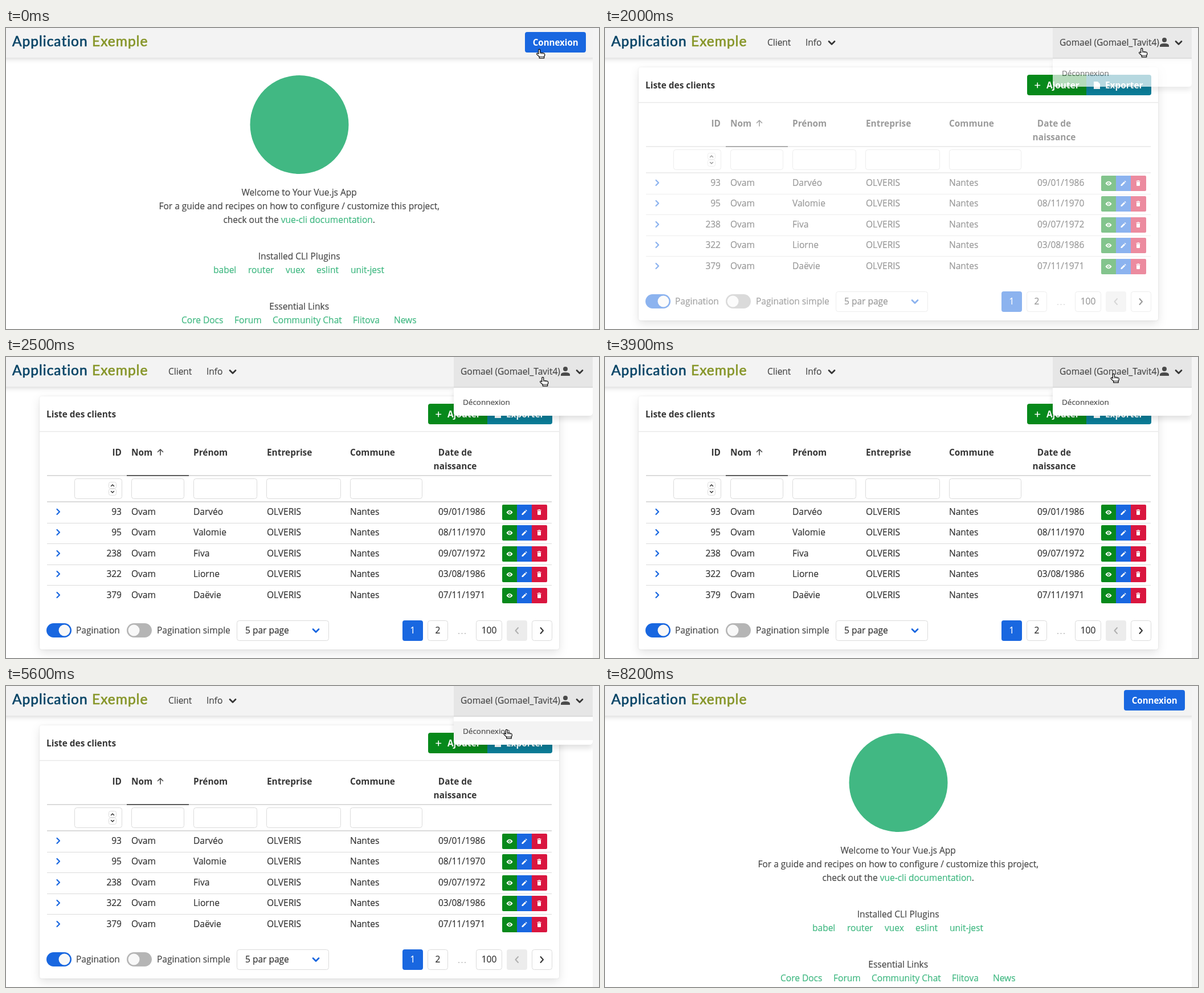
An HTML page that plays this animation: 1041x528 px, repeating every 8.9 s.

```html
<!DOCTYPE html>
<html lang="fr">
<head>
<meta charset="utf-8">
<title>Application Exemple</title>
<style>
html, body { margin: 0; width: 100%; height: 100%; overflow: hidden; background: #fff; }
svg { display: block; width: 1041px; height: 528px; }
text {
  font: 15.53px "Open Sans", "Noto Sans", sans-serif; white-space: pre;
  color: #4a4a4a; fill: currentColor; stroke: currentColor; stroke-width: .22;
}
.b { font-weight: 700; font-size: 15.4px; color: #363636; stroke: none; }
.w { color: #fff; }
.dark { color: #363636; }
.link { color: #42b983; fill: currentColor; stroke: currentColor; }
.small { font-size: 13.5px; }
.button { font-size: 15.1px; }
.brand { font: 24.5px Lato, "Open Sans", sans-serif; letter-spacing: 1px; stroke-width: .7; }
.navy { color: #0b4668; }
.olive { color: #87962a; }
.line { fill: none; stroke-linecap: round; stroke-linejoin: round; }
.box { fill: #fff; stroke: #dbdbdb; }
.bar { filter: drop-shadow(0 2px 4px rgba(10,10,10,.17)); }
.card { filter: drop-shadow(0 6px 8px rgba(10,10,10,.11)) drop-shadow(0 0 1px rgba(10,10,10,.1)); }
.menu { filter: drop-shadow(0 6px 5px rgba(10,10,10,.12)); }
</style>
</head>
<body>
<svg id="stage" viewBox="0 0 1041 528" xmlns="http://www.w3.org/2000/svg"></svg>
<script>
const LOOP = 8900;
const BLUE = '#1967e0', GREEN = '#07891b', RED = '#d9163f', TEAL = '#0b7c97';

const text = (x, y, s, cls = '', anchor = 'start') =>
  `<text x="${x}" y="${y}" class="${cls}" text-anchor="${anchor}">${s}</text>`;
const rect = (x, y, w, h, fill, r = 0, more = '') =>
  `<rect x="${x}" y="${y}" width="${w}" height="${h}" rx="${r}" fill="${fill}" ${more}/>`;
const box = (x, y, w, h, r = 4) =>
  `<rect class="box" x="${x + .5}" y="${y + .5}" width="${w - 1}" height="${h - 1}" rx="${r}"/>`;
const line = (d, color, width = 2) =>
  `<path class="line" d="${d}" stroke="${color}" stroke-width="${width}"/>`;
const down = (x, y, color) => line(`M${x - 5} ${y - 2.5}l5 5 5-5`, color, 2.8);
const group = (id, body) => `<g id="${id}">${body}</g>`;

function homePage() {
  const mid = (y, s) => text(514.7, y, s, '', 'middle');
  const links = (y, list) => list.map(([x, s]) => text(x, y, s, 'link')).join('');
  return '<circle cx="515" cy="169.5" r="86.5" fill="#41b883"/>' +
    mid(294, 'Welcome to Your Vue.js App') +
    mid(318, 'For a guide and recipes on how to configure / customize this project,') +
    mid(342, 'check out the <tspan class="link">vue-cli documentation</tspan>.') +
    mid(406, 'Installed CLI Plugins') +
    links(430, [[364, 'babel'], [425, 'router'], [491, 'vuex'], [545, 'eslint'], [605, 'unit-jest']]) +
    mid(494, 'Essential Links') +
    links(518, [[308, 'Core Docs'], [401, 'Forum'], [468, 'Community Chat'], [609, 'Flitova'], [681, 'News']]);
}

function tableRow([id, first, date], i) {
  const c = Math.round(271 + i * 36.5 - .1), top = c - 12;
  return line(`M89.5 ${c - 4}l4.5 4.5-4.5 4.5`, BLUE, 2.2) +
    text(203, c + 6, id, 'dark', 'end') + text(220, c + 6, 'Ovam', 'dark') +
    text(329, c + 6, first, 'dark') + text(458, c + 6, 'OLVERIS', 'dark') +
    text(604, c + 6, 'Nantes', 'dark') + text(759, c + 6, date, 'dark') +
    rect(871, top, 30, 27, GREEN, 2) + rect(920, top, 30, 27, RED, 2) + rect(897, top, 26, 27, BLUE) +
    `<g transform="translate(0 ${top + 13.5})">
      <path d="M878.5 0q5.5-7.5 11 0q-5.5 7.5-11 0z" fill="#fff"/>
      <circle cx="884" r="2.2" fill="${GREEN}"/><circle cx="884" r="1.1" fill="#fff"/>
      <path d="M905.5 4.5v-2l5.6-5.6 2 2-5.6 5.6zM911.8-3.8l1-1 2 2-1 1z" fill="#fff"/>
      <path d="M932.5-4.5h2l.5-.7h2l.5.7h2v1.2h-7zM933-2.5h6v6q0 1-1 1h-4q-1 0-1-1z" fill="#fff"/>
    </g>` +
    (i < 4 ? rect(72, c + 20, 886, 1, '#dbdbdb') : '');
}

function toggle(x, on) {
  return rect(x, 467, 44, 25, on ? BLUE : '#b5b5b5', 12.5) +
    `<circle cx="${x + (on ? 31.5 : 12.5)}" cy="479.5" r="10" fill="#f8f8f8"/>`;
}

function pager() {
  const num = (x, s, cls = 'dark') => text(x, 485, s, cls, 'middle');
  return toggle(71, true) + text(123, 485, 'Pagination') +
    toggle(212, false) + text(265, 485, 'Pagination simple') +
    box(405, 462, 162, 36) + text(420, 485, '5 par page', 'dark') + down(544, 480, BLUE) +
    rect(696, 462, 36, 36, BLUE, 4) + num(714, '1', 'w') +
    box(740, 462, 36, 36) + num(758, '2') +
    '<g fill="#b5b5b5"><circle cx="795" cy="485" r="1"/><circle cx="800.5" cy="485" r="1"/><circle cx="806" cy="485" r="1"/></g>' +
    box(825, 462, 46, 36) + num(848, '100') +
    rect(879, 462, 36, 36, '#ececec', 4) + line('M899 475l-4.5 5 4.5 5', '#b0b0b0') +
    box(923, 462, 36, 36) + line('M938.5 475l4.5 5-4.5 5', '#363636');
}

function clientPage() {
  const rows = [
    [93, 'Darvéo', '09/01/1986'], [95, 'Valomie', '08/11/1970'], [238, 'Fiva', '09/07/1972'],
    [322, 'Liorne', '03/08/1986'], [379, 'Daëvie', '07/11/1971']];
  const fields = [[120, 84], [220, 93], [329, 112], [457, 131], [604, 127]];
  const heads = [[220, 'Nom'], [329, 'Prénom'], [458, 'Entreprise'], [604, 'Commune']];
  return rect(59, 69, 912, 444, '#fff', 4, 'class="card"') +
    rect(59, 130, 912, 1, '#e8e8e8') + rect(59, 131, 912, 1, '#f6f6f6') +
    text(71, 106, 'Liste des clients', 'b') +
    rect(741, 82, 110, 36, GREEN, 4) + rect(849, 82, 110, 36, TEAL, 4) + rect(845, 82, 10, 36, TEAL) +
    line('M755 100.5h8.5M759.2 96.2v8.6', '#fff', 1.6) + text(775, 106, 'Ajouter', 'b w') +
    '<path d="M858 94h7l4 4v9h-11z" fill="#fff"/>' + text(878, 106, 'Exporter', 'b w') +
    text(203, 173, 'ID', 'b', 'end') + heads.map(([x, s]) => text(x, 173, s, 'b')).join('') +
    text(788.5, 173, 'Date de', 'b', 'middle') + text(788.5, 197, 'naissance', 'b', 'middle') +
    line('M271 172v-9.5M266.5 166.5l4.5-4.5 4.5 4.5', '#4a4a4a', 1.6) +
    rect(72, 207, 886, 2, '#dbdbdb') + rect(212, 207, 109, 2, '#5c5c5c') +
    fields.map(([x, w]) => box(x, 213, w, 36)).join('') +
    box(180, 219, 14, 12, 3) + box(180, 231, 14, 12, 3) +
    line('M184.5 226.5l2.5-2.5 2.5 2.5M184.5 235.5l2.5 2.5 2.5-2.5', '#363636', 1.5) +
    rect(72, 253, 886, 2, '#dbdbdb') +
    rows.map(tableRow).join('') + pager() +
    rect(71, 134, 889, 368, '#fff', 0, 'id="veil"');
}

const header = rect(-10, -10, 1060, 62, '#f3f3f3', 0, 'class="bar"') +
  text(11, 32, 'Application', 'brand navy') + text(151, 32, 'Exemple', 'brand olive');

const login = rect(909, 5, 111, 40, '#bdd0ee', 6, 'id="ring"') +
  rect(911, 7, 107, 36, BLUE, 4, 'id="button"') +
  text(964.7, 31, 'Connexion', 'b w button', 'middle') +
  '<rect id="dots" x="922.5" y="13.5" width="84" height="23" fill="none" stroke="#fff" stroke-dasharray="1 1"/>';

const nav = text(285, 31, 'Client') + text(352, 31, 'Info') + down(398, 26, '#363636') +
  group('menu',
    rect(786, 0, 244, 53, '#e6e6e6') +
    '<path class="menu" d="M786 53h244v44q0 6-6 6h-232q-6 0-6-6z" fill="#fff"/>' +
    rect(786, 52, 244, 2, '#dbdbdb') +
    rect(786, 62, 244, 33, '#f3f3f3', 0, 'id="hover"') +
    text(802, 84, 'Déconnexion', 'small')) +
  text(798, 31, 'Gomael (Gomael_Tavit4)') +
  '<path d="M974 33v-2q0-4 8-4t8 4v2z" fill="#4a4a4a"/><circle cx="982" cy="21" r="4" fill="#4a4a4a"/>' +
  down(1007, 26, '#363636');

const hand = `<path d="M3.8 9.6V2.8a1.4 1.4 0 0 1 2.9 0V7l6 1q2 .4 2 2.3v2.2l-1 1.4v3H5.2v-2.6L1.1 10.6q-1.1-1.8.4-2.3 1.2-.4 2.3 1.3z"
  fill="#fff" stroke="#000" stroke-width="1.2" stroke-linejoin="round"/>
  <path d="M6.9 9.5v-2M9.4 9.8v-2M11.9 10v-1.8M5.4 14.2h8.2" stroke="#000" stroke-width=".9"/>`;
const arrow = `<path d="M.7.9v16l3.7-3.4 2.5 6 2.7-1.1-2.5-5.8h5z"
  fill="#fff" stroke="#000" stroke-width="1.2" stroke-linejoin="round"/>`;

document.getElementById('stage').innerHTML =
  group('home', homePage()) + group('clients', clientPage()) +
  header + group('login', login) + group('nav', nav) +
  rect(1030, 0, 11, 528, '#f4f4f4') +
  group('hand', hand) + group('arrow', arrow);

// Each table holds [start ms, value...]; a value stays until the next row.
const cursorSteps = [
  [0, 'hand', 931, 36], [900, 'hand', 996, 37], [1400, 'hand', 937, 34],
  [3900, 'hand', 887.5, 28], [4000, 'hand', 808, 23], [4100, 'arrow', 742, 20], [4200, 'arrow', 714, 18],
  [4800, 'hand', 796, 26], [4900, 'hand', 803, 28],
  [5400, 'hand', 824, 44], [5500, 'hand', 858, 70], [5600, 'hand', 873.5, 75],
  [7000, 'arrow', 877, 76], [7700, 'arrow', 770, 70], [7800, 'arrow', 560, 58], [7900, 'arrow', 310, 40],
  [8000, 'arrow', 110, 20], [8100, 'arrow', 10, 2], [8200, 'none', 0, 0]];
const menuSteps = [
  [0, 0], [1900, .3], [2000, .7], [2100, 1], [4100, .7], [4200, .3], [4300, 0], [4800, .5], [4900, 1]];
const veilSteps = [[0, .5], [2300, .27], [2500, 0]];
const buttonSteps = [[0, BLUE], [100, '#1862d6'], [7000, BLUE]];

const at = (steps, t) => steps.findLast(s => s[0] <= t);
const el = id => document.getElementById(id);
const show = (id, on) => el(id).setAttribute('display', on ? 'inline' : 'none');

function draw(t) {
  const inside = t >= 1900 && t < 7000;
  const focus = t >= 1600 && t < 1900;
  show('home', !inside);
  show('login', !inside);
  show('clients', inside);
  show('nav', inside);
  show('ring', focus);
  show('dots', focus);
  show('hover', t >= 5500);
  el('button').setAttribute('fill', at(buttonSteps, t)[1]);
  el('menu').setAttribute('opacity', at(menuSteps, t)[1]);
  el('veil').setAttribute('opacity', at(veilSteps, t)[1]);
  const [, kind, x, y] = at(cursorSteps, t);
  for (const id of ['hand', 'arrow']) {
    show(id, id === kind);
    el(id).setAttribute('transform', `translate(${x} ${y})`);
  }
}

const start = performance.now();
function tick() {
  draw((performance.now() - start) % LOOP);
  requestAnimationFrame(tick);
}
tick();
</script>
</body>
</html>
```
